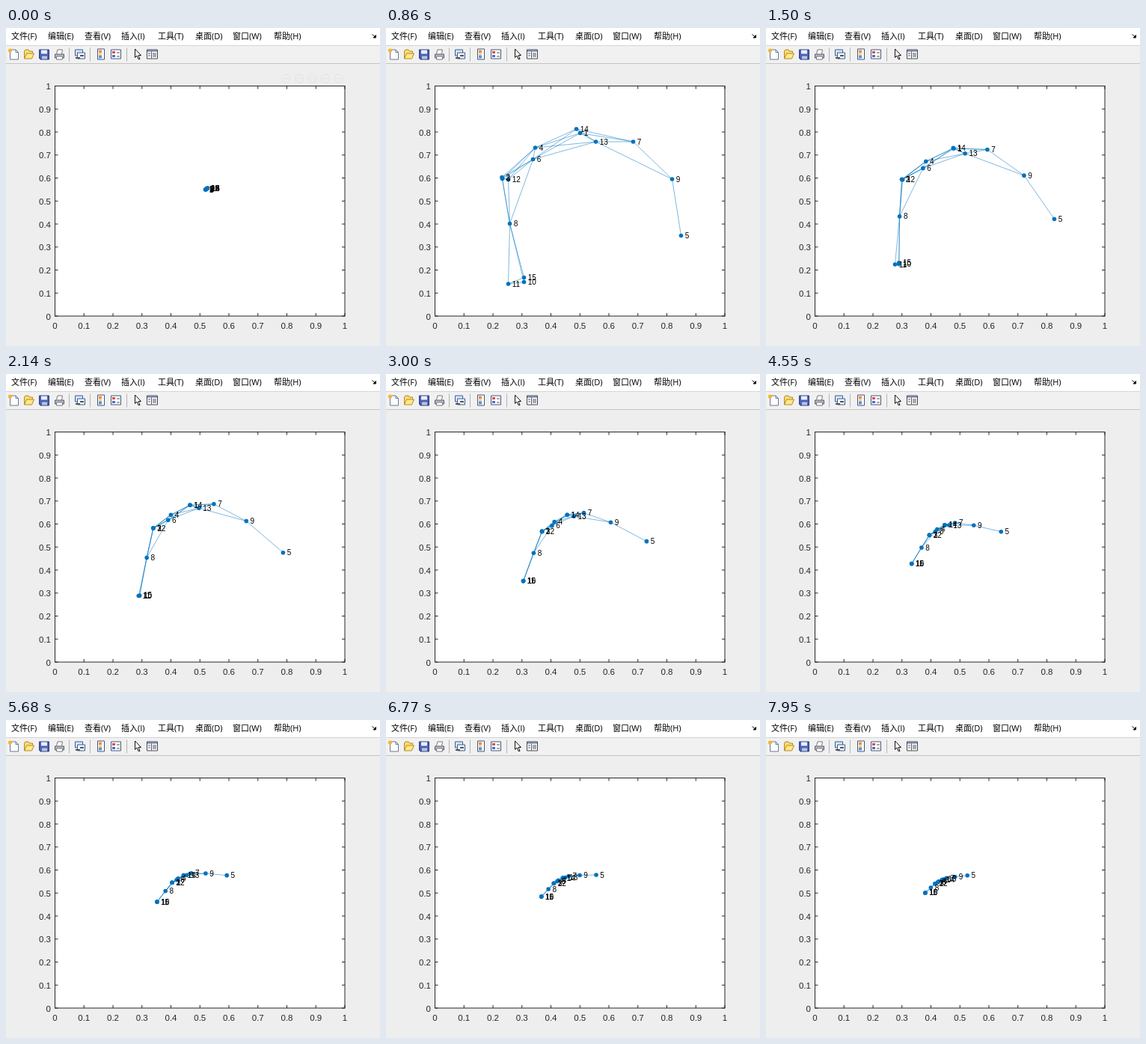
Write an HTML page that moves like this. It is 500 by 425 pixels and loops after 8000 ms.

```html
<!DOCTYPE html>
<html lang="zh">
<head>
<meta charset="utf-8">
<title>Consensus</title>
<style>
  html, body { margin: 0; width: 100%; height: 100%; overflow: hidden; background: #eee; }
  svg { display: block; width: 500px; height: 425px; }
  .menu { font: 11px "Open Sans", "Noto Sans CJK SC", "Noto Sans CJK", sans-serif; fill: #000; }
  .tick { font: 11.5px "Liberation Sans", Arial, sans-serif; fill: #262626; }
  .label { font: 10px "Liberation Sans", Arial, sans-serif; fill: #000; }
</style>
</head>
<body>
<svg viewBox="0 0 500 425">
  <rect width="500" height="425" fill="#eee"/>
  <rect width="500" height="23" fill="#fff"/>
  <rect y="23" width="500" height="25" fill="#f1f1f1"/>
  <path d="M0 23.500H500" stroke="#d4d4d4"/>
  <path d="M0 47.500H500" stroke="#c4c4c4"/>
  <g id="menu" class="menu"></g>
  <path d="M489.500 8.500L493 11.500M494.500 9.500V13H491Z" stroke="#111" fill="#111"/>

  <g id="toolbar" transform="translate(0 -.5)">
    <path d="M84.500 27V45M112.500 27V45M161.500 27V45" stroke="#b4b4b4"/>
    <!-- new -->
    <path d="M5.500 29.500H13L16.500 33V42.500H5.500Z" fill="#fff" stroke="#6a7890"/>
    <path d="M13 29.500V33H16.500" fill="none" stroke="#6a7890"/>
    <circle cx="5.500" cy="30.500" r="2.600" fill="#f2b632"/>
    <!-- open -->
    <path d="M24.500 41.500V31.500L26 29.500H30L31.500 31.500H35.500V34" fill="#f9dc78" stroke="#b68a20"/>
    <path d="M24.500 41.500L27.500 34.500H37.500L34.500 41.500Z" fill="#ffe88c" stroke="#b68a20"/>
    <!-- save -->
    <path d="M44.500 29.500H57.500V42.500H46L44.500 41Z" fill="#4a62b4" stroke="#2c3c82"/>
    <path d="M47 30H55V35H47Z" fill="#e8eefa"/>
    <path d="M48 38H55V42H48Z" fill="#b9c3dc"/>
    <!-- print -->
    <path d="M67.500 35L69 29.500H75.500L74.500 35" fill="#fff" stroke="#777"/>
    <path d="M65.500 35.500H77.500V40.500H65.500Z" fill="#b8bcc6" stroke="#555d6c"/>
    <path d="M67.500 38.500H75.500V42.500H67.500Z" fill="#fff" stroke="#777"/>
    <!-- link -->
    <path d="M92.500 29.500H102.500V37.500H92.500Z" fill="#d8e6f7" stroke="#3b6095"/>
    <path d="M95.500 33.500H105.500V41.500H95.500Z" fill="#eef4fc" stroke="#3b6095"/>
    <path d="M93 40.500H99M99 37.500H104" stroke="#555" stroke-width="2"/>
    <!-- colour bar -->
    <path d="M122.500 28.500H131.500V42.500H122.500Z" fill="#fff" stroke="#44557a"/>
    <path d="M124 30H128V34H124Z" fill="#ec8a5a"/>
    <path d="M124 34H128V37H124Z" fill="#f3dc6e"/>
    <path d="M124 37H128V41H124Z" fill="#5a8fe0"/>
    <!-- legend -->
    <path d="M140.500 29.500H153.500V41.500H140.500Z" fill="#fff" stroke="#44557a"/>
    <path d="M142 31.500H146V34.500H142Z" fill="#d65050"/>
    <path d="M142 36.500H146V39.500H142Z" fill="#4a70d0"/>
    <path d="M148 33.500H152M148 38.500H152" stroke="#555"/>
    <!-- pointer -->
    <path d="M172.500 28.500V40L175 37.500L177 42H179L177 37H180.500Z" fill="#fff" stroke="#111"/>
    <!-- inspector -->
    <path d="M188.500 29.500H202.500V41.500H188.500Z" fill="#fff" stroke="#445"/>
    <path d="M189 30H202V32H189Z" fill="#6d7f9e"/>
    <path d="M194.500 32V41M196 34.500H201M196 36.500H201M196 38.500H201M190 34.500H193M190 37.500H193" stroke="#556"/>
  </g>

  <g transform="translate(.5 .5)">
    <rect x="65" y="77" width="387.500" height="307.500" fill="#fff" stroke="#262626"/>
    <g id="axes"></g>
    <g id="hover" fill="none" stroke="#e3e3e3"></g>
    <g id="edges" stroke="#0072bd" stroke-opacity=".5"></g>
    <g id="nodes" fill="#0072bd"></g>
    <g id="labels" class="label"></g>
  </g>
</svg>
<script>
const LOOP = 8000, STEP = 45.43, RESET = 42;
const GAIN = 0.0235;      // share of each neighbour difference covered per step
const ANCHOR = 18;        // step at which the known positions hold
const LAST = Math.floor((LOOP - RESET) / STEP);
const BOX = { left: 65, right: 452.5, top: 77, bottom: 384.5 };

const $ = id => document.getElementById(id);
function add(parent, tag, attrs, text) {
  const el = document.createElementNS("http://www.w3.org/2000/svg", tag);
  set(el, attrs);
  if (text !== undefined) el.textContent = text;
  return $(parent).appendChild(el);
}
function set(el, attrs) {
  for (const key in attrs) el.setAttribute(key, attrs[key]);
}

// Menu
const menu = { 7: "文件(F)", 56: "编辑(E)", 105: "查看(V)", 154: "插入(I)",
               203: "工具(T)", 253: "桌面(D)", 303: "窗口(W)", 358: "帮助(H)" };
for (const x in menu) add("menu", "text", { x, y: 15 }, menu[x]);

// Ticks on all four sides
const { left, right, top: ceiling, bottom } = BOX;
for (let i = 0; i <= 10; i++) {
  const x = left + (right - left) * i / 10, y = bottom - (bottom - ceiling) * i / 10;
  add("axes", "path", {
    d: `M${x} ${ceiling}v4M${x} ${bottom}v-4M${left} ${y}h4M${right} ${y}h-4`, stroke: "#262626"
  });
  add("axes", "text", { x, y: 401.5, class: "tick", "text-anchor": "middle" }, i / 10);
  add("axes", "text", { x: 59.5, y: y + 4.5, class: "tick", "text-anchor": "end" }, i / 10);
}

// Faint axes tools, visible until the reset
for (let i = 0; i < 5; i++) {
  const x = 374 + 17.5 * i;
  add("hover", "circle", { cx: x, cy: 67, r: 5.5 });
  add("hover", "path", { d: `M${x - 3} 67h6` });
}

// Graph: positions of nodes 1 to 15 at the anchor step
const anchor = [
  [259, 140], [154.5, 199], [155, 201], [199, 159.5], [394, 277],
  [196, 175], [330, 151.5], [165, 261], [382, 201.5], [184, 339],
  [163, 341.5], [163, 202], [280, 151.5], [254, 134.5], [184, 333]
];
const neighbours = {
  1: [4, 6, 7, 13, 14], 2: [3, 4, 6, 8, 12], 3: [4, 6, 8, 12],
  4: [6, 12, 13, 14], 5: [9], 6: [8, 12, 13, 14], 7: [9, 13, 14],
  8: [10, 11, 12, 15], 9: [13], 10: [11, 15], 11: [15], 13: [14]
};
const edges = Object.entries(neighbours)
  .flatMap(([a, list]) => list.map(b => [a - 1, b - 1]));

// Consensus step: every node is drawn towards its neighbours
function pull(points) {
  const force = points.map(() => [0, 0]);
  for (const [a, b] of edges) for (const k of [0, 1]) {
    const d = GAIN * (points[b][k] - points[a][k]);
    force[a][k] += d;
    force[b][k] -= d;
  }
  return force;
}
const sum = (p, q) => p.map((v, i) => v.map((c, k) => c + q[i][k]));
const clamp = (v, low, high) => Math.min(high, Math.max(low, v));

// Earlier steps come from a cubic Taylor expansion around the anchor
function rewind(steps) {
  let term = anchor, result = anchor;
  for (let order = 1; order <= 3; order++) {
    term = pull(term).map(v => v.map(c => -c * steps / order));
    result = sum(result, term);
  }
  return result.map(([x, y]) => [clamp(x, left, right), clamp(y, ceiling, bottom)]);
}

const states = [];
for (let n = 0; n < ANCHOR; n++) states[n] = rewind(ANCHOR - n);
states[ANCHOR] = anchor;
for (let n = ANCHOR; n < LAST; n++) states[n + 1] = sum(states[n], pull(states[n]));

// Nearly converged cluster left over from the run before
const settled = anchor.map((_, i) => {
  const s = i / 14 - 0.5;
  return [267.5 + 3 * s, 214.5 - 2 * s];
});

const lines = edges.map(() => add("edges", "line", {}));
const dots = anchor.map(() => add("nodes", "circle", { r: 2.8 }));
const labels = anchor.map((_, i) => add("labels", "text", {}, i + 1));

let shown = null;
function draw(step) {
  if (step === shown) return;
  shown = step;
  const points = step < 0 ? settled : states[Math.min(step, LAST)];
  $("hover").style.display = step < 0 ? "" : "none";
  edges.forEach(([a, b], i) => set(lines[i], {
    x1: points[a][0], y1: points[a][1], x2: points[b][0], y2: points[b][1]
  }));
  points.forEach(([x, y], i) => {
    set(dots[i], { cx: x, cy: y });
    set(labels[i], { x: x + 5.3, y: y + 3.5 });
  });
}

function frame() {
  draw(Math.floor((performance.now() % LOOP - RESET) / STEP));
  requestAnimationFrame(frame);
}
frame();
</script>
</body>
</html>
```
